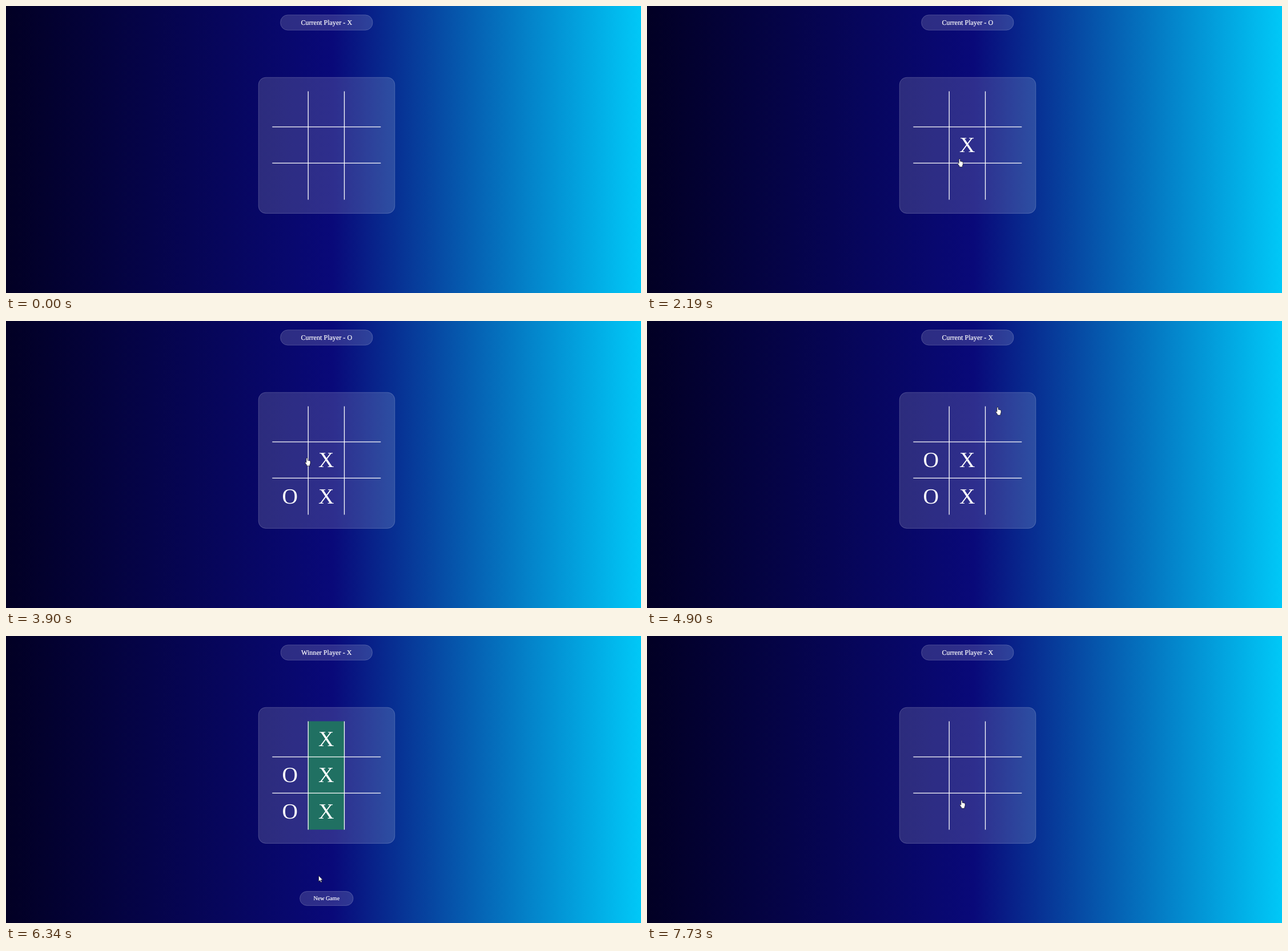
Animation, 1112 px wide and 503 px high, one loop 7.99 s. Source, as an HTML page:

```html
<!DOCTYPE html>
<html lang="en">
<head>
<meta charset="utf-8">
<title>Tic tac toe</title>
<style>
  html, body { margin: 0; width: 100%; height: 100%; overflow: hidden; }
  body { background: linear-gradient(90deg, #020024 0%, #090979 51.5%, #00d4ff 103%); }
  svg { display: block; width: 100%; height: 100%; }
  text {
    font-family: "Liberation Serif", "Times New Roman", serif;
    fill: #fff;
    text-anchor: middle;
    text-rendering: geometricPrecision;
  }
  .label { stroke: #fff; stroke-width: .2; }
  .glass { fill: rgba(255, 255, 255, .15); stroke: rgba(255, 255, 255, .26); stroke-width: .8; }
  .lines { stroke: #fff; stroke-width: 1.3; }
  .mark { font-size: 38px; }
  .cursor { fill: #fff; stroke: #000; stroke-width: .6; stroke-linejoin: round; }
</style>
</head>
<body>
<svg viewBox="0 0 1112 503">
  <rect id="pill" class="glass" y="15.7" height="26.6" rx="12.7"/>
  <text id="title" class="label" x="561.3" y="33.2" font-size="12.1"></text>

  <rect class="glass" x="442.2" y="125.2" width="238.6" height="238.2" rx="12.7"/>
  <rect id="win" x="528.8" y="149.4" width="63.7" height="190" fill="#207062"/>
  <path class="lines" d="M529.2 149.4v190m63.3 0v-190M466.3 211.9h190m0 63.4h-190" fill="none"/>
  <g id="marks"></g>

  <g id="newGame">
    <rect class="glass" x="514.6" y="447.6" width="93.4" height="24.8" rx="12.4"/>
    <text class="label" x="561.3" y="463.3" font-size="10.13">New Game</text>
  </g>

  <g id="pointer">
    <path id="arrow" class="cursor" d="M0 0V10.3L2.4 8.2 4 12 5.6 11.3 4 7.6H7.2Z"/>
    <path id="hand" class="cursor" d="M-1.1 1Q-1.1-.1 0-.1T1.1 1V4.1L4.2 4.7Q6 5 6 6.2V9.6L5 12V14H-.3V12.4L-3 8.9Q-3.5 7.5-2.3 7.2L-1.1 8.2Z"/>
    <circle id="press" r="9.4" fill="rgba(255, 240, 0, .52)"/>
  </g>
</svg>
<script>
const LOOP = 7990, ENTER = 800, RESET = 7200;
const CELL = 63.4, STEP = 67, STEPS = 3, PRESS = 200;

// Cells are numbered 0 to 8, row by row
const turns = [
  { time: 1930, cell: 4 },
  { time: 2530, cell: 6 },
  { time: 3490, cell: 7 },
  { time: 4500, cell: 3 },
  { time: 5630, cell: 1 }
];
const clicks = [...turns.map(turn => turn.time), RESET];

// The pointer jumps to each stop in a few even steps, the last one on arrival
const stops = [
  { at: 860, x: 830, y: 389 },
  { at: 1190, x: 569.5, y: 304 },
  { at: 1600, x: 562, y: 246 },
  { at: 2260, x: 518, y: 312 },
  { at: 2990, x: 550.5, y: 311 },
  { at: 3900, x: 527, y: 240 },
  { at: 4170, x: 502, y: 236 },
  { at: 4900, x: 614, y: 151 },
  { at: 5230, x: 560.5, y: 169 },
  { at: 6140, x: 546, y: 406.5 },
  { at: 6340, x: 547.5, y: 420 },
  { at: 6600, x: 554.3, y: 451 },
  { at: 7730, x: 551, y: 288 }
];

const el = id => document.getElementById(id);
const show = (node, on) => node.setAttribute("visibility", on ? "visible" : "hidden");
const player = i => i % 2 ? "O" : "X";

const marks = turns.map(({ cell }, i) => {
  const mark = document.createElementNS("http://www.w3.org/2000/svg", "text");
  mark.setAttribute("class", "mark");
  mark.setAttribute("x", 497.3 + cell % 3 * CELL);
  mark.setAttribute("y", 192.7 + Math.floor(cell / 3) * CELL);
  mark.textContent = player(i);
  el("marks").append(mark);
  return mark;
});

function pointerAt(t) {
  let x = 880, y = 433;
  for (const stop of stops) {
    const step = STEPS + Math.floor((t - stop.at) / STEP);
    const done = Math.min(Math.max(step / STEPS, 0), 1);
    x += (stop.x - x) * done;
    y += (stop.y - y) * done;
  }
  return [x, y];
}

function draw(t) {
  const played = t < RESET ? turns.filter(turn => t >= turn.time).length : 0;
  const won = played === turns.length;
  marks.forEach((mark, i) => show(mark, i < played));
  show(el("win"), won);
  show(el("newGame"), won);

  el("title").textContent = won ? "Winner Player - X" : "Current Player - " + player(played);
  const width = won ? 160.2 : 161.3;
  el("pill").setAttribute("x", 561.3 - width / 2);
  el("pill").setAttribute("width", width);

  const [x, y] = pointerAt(t);
  const visible = t >= ENTER;
  const overGrid = x > 466 && x < 656 && y > 149 && y < 339;
  el("pointer").setAttribute("transform", `translate(${x} ${y})`);
  show(el("hand"), visible && overGrid);
  show(el("arrow"), visible && !overGrid);
  show(el("press"), clicks.some(time => t >= time - PRESS && t < time));
}

const begin = performance.now();
function frame() {
  draw((performance.now() - begin) % LOOP);
  requestAnimationFrame(frame);
}
frame();
</script>
</body>
</html>
```
